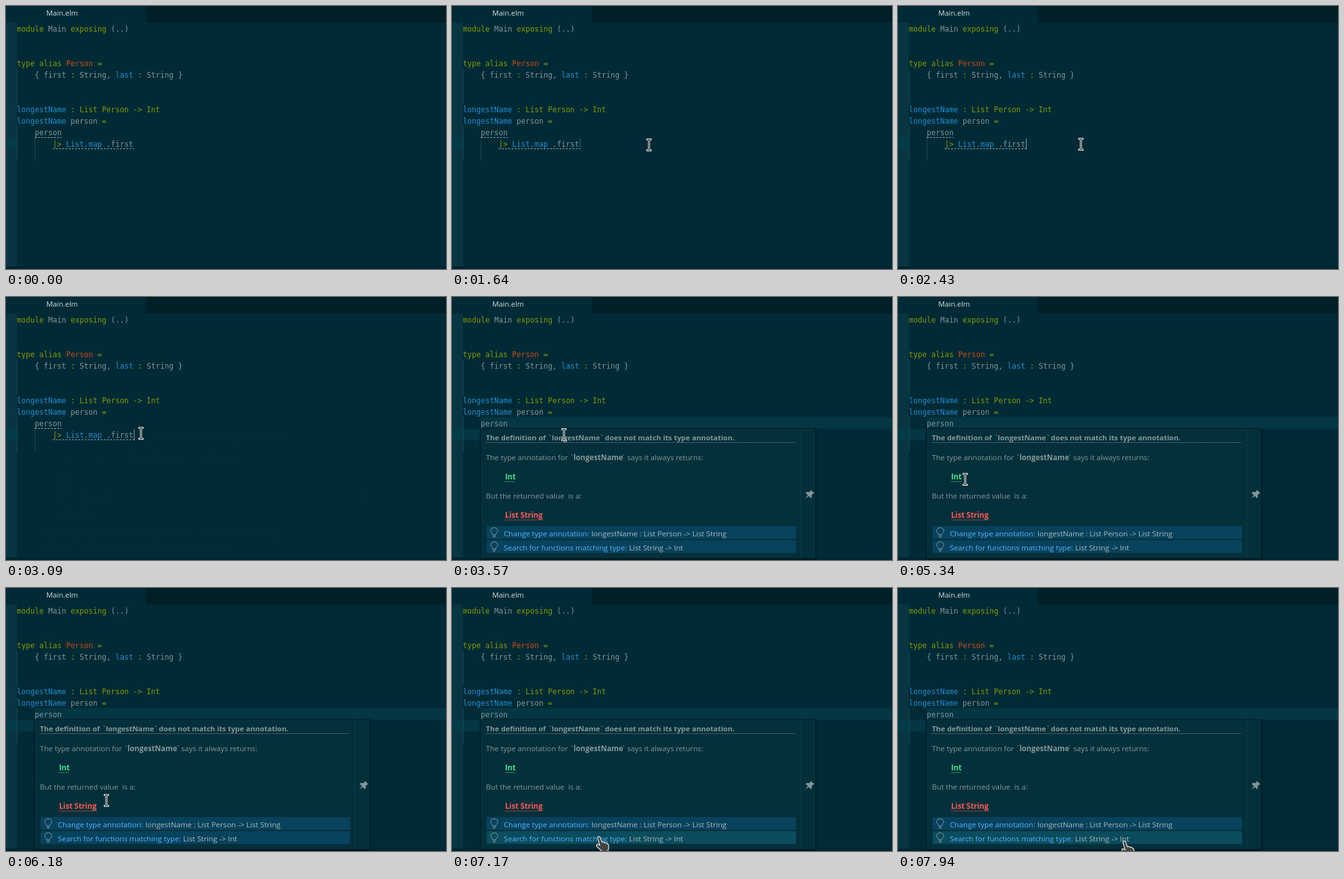
An HTML page that plays this animation: 688x411 px, repeating every 8 s.

```html
<!DOCTYPE html>
<html lang="en">
<head>
<meta charset="utf-8">
<title>Editor</title>
<style>
html, body { margin: 0; width: 100%; height: 100%; overflow: hidden; background: #002b36; }
svg { display: block; width: 688px; height: 411px; }
text { white-space: pre; font: 11.67px "Open Sans", "Noto Sans", sans-serif; }
#code text { font: 11.627px "DejaVu Sans Mono", "Noto Sans Mono", monospace; }
#tip .bold { font-weight: 700; }
#tip .head { font-weight: 700; font-size: 11.35px; }
#box { filter: drop-shadow(0 1px 1px rgba(0, 10, 14, .7)); }
.guide { stroke: #1c4852; }
</style>
</head>
<body>
<svg viewBox="0 0 688 411">
  <rect width="688" height="411" fill="#002b36"/>
  <rect x="219" width="469" height="26" fill="#001f27"/>
  <rect y="26" width="17" height="385" fill="#073642"/>
  <rect y="206" width="17" height="18" fill="#033c49"/>
  <rect y="407" width="688" height="4" fill="#00252f"/>
  <text x="63" y="15" style="font-size:11.4px;fill:#d5dfdf">Main.elm</text>
  <path id="range" d="M45 188H688V206H200V224H17V206H45Z" fill="#043643"/>
  <path class="guide" d="M17.5 99V152M17.5 188V242M45.5 206V242"/>
  <g id="code"></g>
  <path id="dashes" d="M45 205.5H87M73 223H200" stroke="#8fb0b4" stroke-dasharray="3 2"/>
  <path id="caret" d="M200.5 207V224" stroke="#93a1a1"/>
  <g id="tip">
    <rect id="box" x="44.5" y="205.5" width="524" height="203" fill="#03303b" stroke="#001c24"/>
    <path d="M545.5 206V408" stroke="#0b3f4b"/>
    <path d="M53 227.5H537" stroke="#7b8f92" stroke-dasharray="1 1"/>
    <path d="M83 288.5H99" stroke="#4be38c" stroke-dasharray="1 1"/>
    <path d="M83 348.5H143" stroke="#ff5a52" stroke-dasharray="1 1"/>
    <rect id="change" x="54" y="358" width="484" height="20" rx="2"/>
    <rect id="search" x="54" y="380" width="484" height="20" rx="2"/>
    <g id="bulb" fill="none" stroke="#8199a2">
      <path d="M63.5 371.5C63.5 369 60.5 368.5 60.5 365.5A5.5 5 0 0 1 71.5 365.5C71.5 368.5 68.5 369 68.5 371.5ZM63.5 373.5H68.5M64.5 375.5H67.5"/>
    </g>
    <use href="#bulb" y="22"/>
    <path d="M552 315L556.5 309.5L553 306.5L554.5 304.5L558.5 305L561 302.5L560.5 301L567 307L565 307L562.5 309.5L562.5 313L561 314.5L558 311Z" fill="#839496"/>
  </g>
  <g id="beam" fill="none" stroke-linecap="square">
    <path id="bar" d="M-2.5 -8.5H-1Q0 -8.5 0 -7.5V7.5Q0 8.5 -1 8.5H-2.5M2.5 -8.5H1Q0 -8.5 0 -7.5M0 7.5Q0 8.5 1 8.5H2.5" stroke="#f2f2f2" stroke-width="3"/>
    <path id="ink" stroke="#111"/>
  </g>
  <g id="hand">
    <path transform="scale(1.2)" fill="#444" stroke="#eee" stroke-linejoin="round"
      d="M-2 1C-2 -1 1 -1 1.5 1L4 7C6 6 7 7 7.5 8C9 7 10.5 8 10.5 9C12 9 12.5 10 12.5 12V15L11 19H4L-3 12.5C-4 10 -2 9 -1 10L1 11Z"/>
  </g>
</svg>
<script>
const $ = id => document.getElementById(id);
const color = { g: '#859900', n: '#839496', b: '#268bd2', o: '#cb4b16' };

function put(parent, x, y, str, fill, cls = '') {
  const el = document.createElementNS('http://www.w3.org/2000/svg', 'text');
  el.setAttribute('x', x);
  el.setAttribute('y', y);
  el.setAttribute('class', cls);
  el.style.fill = fill;
  el.textContent = str;
  $(parent).append(el);
}

// Each part is a colour key followed by its text.
function code(row, col, ...parts) {
  for (const part of parts) {
    const str = part.slice(1);
    put('code', 17 + col * 7, 40 + row * 18, str, color[part[0]]);
    col += str.length;
  }
}
code(0, 0, 'gmodule ', 'nMain ', 'gexposing ', 'n(..)');
code(3, 0, 'gtype alias ', 'oPerson ', 'g=');
code(4, 4, 'n{ first ', 'g: ', 'nString, ', 'blast ', 'g: ', 'nString }');
code(7, 0, 'blongestName ', 'g: List Person -> Int');
code(8, 0, 'blongestName ', 'nperson ', 'g=');
code(9, 4, 'nperson');
code(10, 8, 'g|> ', 'bList.map ', 'n.first');

const grey = '#879899', link = '#55b3ff', pale = '#a9babc';
const plain = (x, y, str, fill = grey) => put('tip', x, y, str, fill);
const bold = (x, y, str, fill = grey) => put('tip', x, y, str, fill, 'bold');
const head = (x, str) => put('tip', x, 224, str, grey, 'head');
head(53, 'The definition of');
head(150, '`');
head(156, 'longestName');
head(231, '`');
head(239, 'does not match its type annotation.');
plain(53, 255, 'The type annotation for');
plain(184, 255, '`');
bold(190, 255, 'longestName');
plain(265, 255, '`');
plain(274, 255, 'says it always returns:');
bold(83, 285, 'Int', '#4be38c');
plain(53, 315, 'But the returned value  is a:');
bold(83, 345, 'List String', '#ff5a52');
plain(81, 374, 'Change type annotation:', link);
plain(218, 374, 'longestName : List Person -> List String', pale);
plain(81, 396, 'Search for functions matching type:', link);
plain(277, 396, 'List String -> Int', pale);
$('ink').setAttribute('d', $('bar').getAttribute('d'));

// Pointer stops: time, x, y
const path = [
  [370, 642, 105], [590, 308, 218], [830, 308, 218], [870, 308, 217],
  [2250, 308, 217], [3040, 211, 213], [3090, 211, 213], [3570, 175, 215],
  [4060, 175, 215], [4300, 169, 243], [4460, 146, 269], [4600, 146, 269],
  [4990, 105, 284], [5340, 105, 285], [5650, 105, 286], [6180, 157, 332],
  [6690, 157, 332], [7170, 230, 389], [7490, 302, 388], [7530, 302, 388], [7940, 354, 396]
];
const ramp = (t, a, b) => Math.min(1, Math.max(0, (t - a) / (b - a)));

function pointer(t) {
  const i = path.findIndex(p => p[0] > t);
  if (i < 0) return path[path.length - 1].slice(1);
  if (i === 0) return path[0].slice(1);
  const a = path[i - 1], b = path[i], k = ramp(t, a[0], b[0]);
  return [1, 2].map(j => Math.round(a[j] + (b[j] - a[j]) * k));
}

function draw(now) {
  const t = now % 8000;
  const [x, y] = pointer(t);
  const fade = ramp(t, 3090, 3570);
  const onLink = y >= 358;
  const fill = hover => hover ? '#0b4c5d' : '#08425d';
  $('tip').style.opacity = $('range').style.opacity = fade;
  $('dashes').style.opacity = 1 - fade;
  $('caret').style.opacity = t < 1640 ? 0 : (0.45 + 0.55 * ramp(t, 1640, 2080)) * (1 - fade);
  $('change').style.fill = fill(onLink && y < 379);
  $('search').style.fill = fill(y >= 379);
  $('beam').style.display = t < 370 || onLink ? 'none' : '';
  $('hand').style.display = onLink ? '' : 'none';
  for (const id of ['beam', 'hand']) $(id).setAttribute('transform', `translate(${x} ${y})`);
  requestAnimationFrame(draw);
}
draw(0);
</script>
</body>
</html>
```
